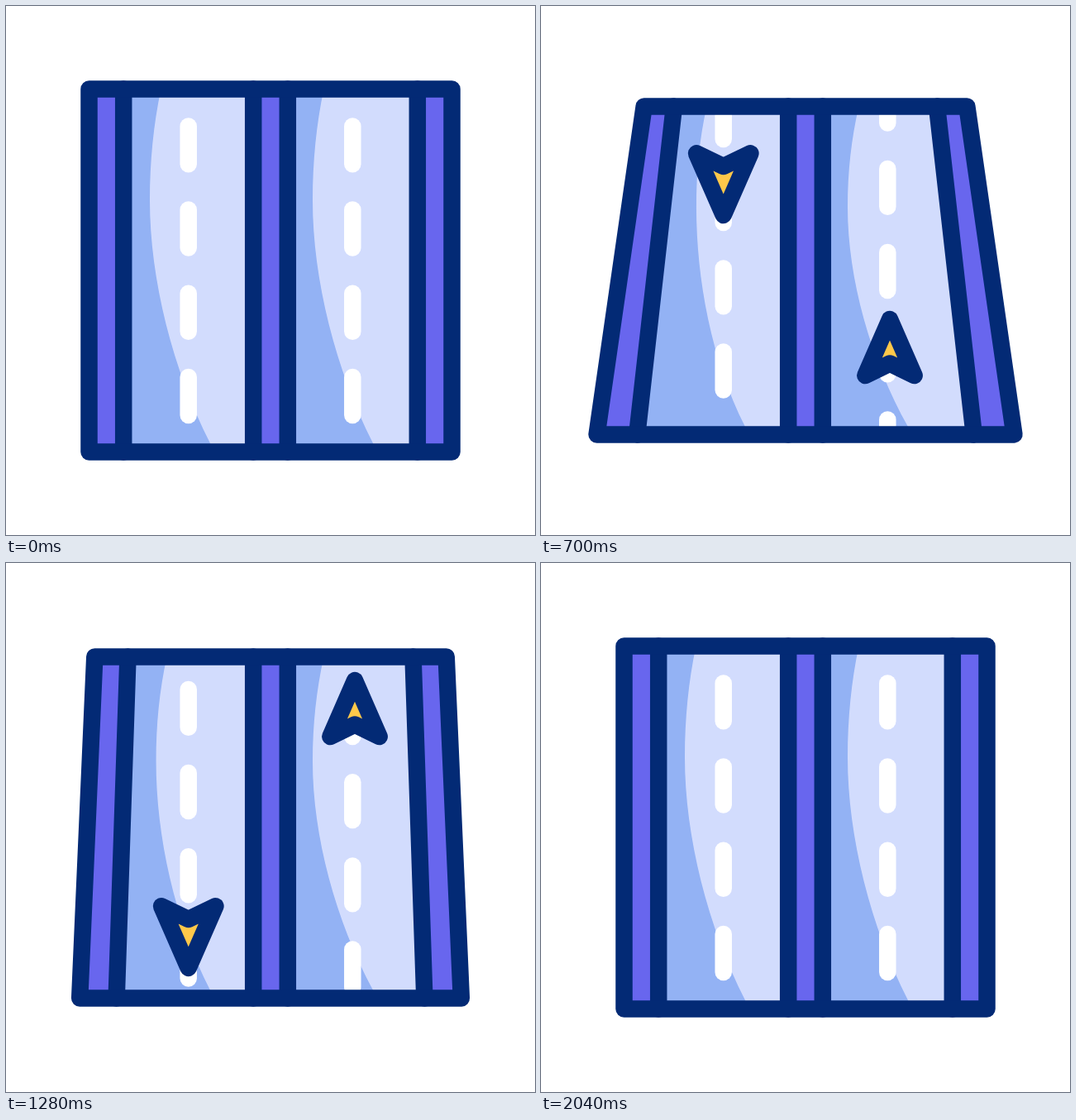
These frames come from a looping animation (640x640 px, 2.2 s). An HTML page with a canvas:

```html
<!DOCTYPE html>
<html lang="en">
<head>
<meta charset="utf-8">
<title>Two-way road</title>
<style>
  html, body { margin: 0; width: 100%; height: 100%; overflow: hidden; background: #fff; }
  canvas { display: block; width: 100vw; height: 100vh; }
</style>
</head>
<body>
<canvas id="stage" width="640" height="640"></canvas>
<script>
const ctx = document.getElementById('stage').getContext('2d');
const LOOP = 2200, STEP = 20;
const NAVY = '#032a75', PURPLE = '#6866ee', LANE = '#d2dcfd', SHADE = '#93b2f4', GOLD = '#ffc84a';
const LINE = 20.5, DASH = 45.9, PERIOD = 101.2, SPEED = 0.4085;

// Left half of the road; the right half mirrors it. bend = shift of the left shade.
const REST = { y: 100.5, top: 100.5, bottom: 100.5, inTop: 142.2, inBottom: 142.2, bend: 0 };
const NEAR = { y: 126.8, top: 130.6, bottom: 59.4, inTop: 165.6, inBottom: 109.8, bend: 17.4 };
const FAR = { y: 103.2, top: 89.3, bottom: 112.2, inTop: 133.5, inBottom: 152.1, bend: 0 };
const POSES = [[200, REST], [900, NEAR], [1600, FAR], [2000, REST]];

const mirror = x => 640 - x;

function ease(t, from, to) {
  const u = Math.min(1, Math.max(0, (t - from) / (to - from)));
  return u * u * (3 - 2 * u);
}

function poseAt(t) {
  const pose = { ...REST };
  for (let i = 1; i < POSES.length; i++) {
    const [t0, a] = POSES[i - 1], [t1, b] = POSES[i];
    if (t < t0) break;
    const k = ease(t, t0, t1);
    for (const key in pose) pose[key] = a[key] + (b[key] - a[key]) * k;
  }
  return pose;
}

function polygon(points) {
  const path = new Path2D();
  points.forEach(([x, y], i) => i ? path.lineTo(x, y) : path.moveTo(x, y));
  path.closePath();
  return path;
}

function fill(path, color) {
  ctx.fillStyle = color;
  ctx.fill(path);
}

function stroke(path, color) {
  ctx.strokeStyle = color;
  ctx.stroke(path);
}

function segment(x0, y0, x1, y1, color) {
  const path = new Path2D();
  path.moveTo(x0, y0);
  path.lineTo(x1, y1);
  stroke(path, color);
}

function shade(x, pose, bend, edge) {
  const scale = (320 - pose.y) / 219.5;
  const y = v => 320 + (v - 320) * scale;
  const b = bend * 0.94;
  const path = new Path2D();
  path.moveTo(edge, y(100.5));
  path.lineTo(x + 13.5 + b, y(100.5));
  path.bezierCurveTo(x + 4.5 + b, y(143), x + bend, y(188), x + bend, y(235));
  path.bezierCurveTo(x + bend, y(331), x + 28 + bend * 0.3, y(440), x + 73, y(529));
  path.lineTo(x + 78, y(539.5));
  path.lineTo(edge, y(539.5));
  fill(path, SHADE);
}

function lane(path, x, pose, bend, edge) {
  fill(path, LANE);
  ctx.save();
  ctx.clip(path);
  shade(x, pose, bend, edge);
  ctx.restore();
}

function dashes(x, shift) {
  const offset = ((shift % PERIOD) + PERIOD) % PERIOD;
  for (let i = -2; i < 5; i++) {
    const y = 145.4 + offset + i * PERIOD;
    segment(x, y, x, y + DASH, '#fff');
  }
}

// dir is 1 for pointing down, -1 for up
function arrow(x, tip, dir, half, length, notch) {
  const back = tip - dir * length;
  const path = polygon([[x, tip], [x - half, back], [x, back + dir * notch], [x + half, back]]);
  fill(path, GOLD);
  stroke(path, NAVY);
}

function draw(t) {
  const p = poseAt(t), y0 = p.y, y1 = mirror(p.y);
  const outline = polygon([[p.top, y0], [mirror(p.top), y0], [mirror(p.bottom), y1], [p.bottom, y1]]);
  const left = polygon([[p.inTop, y0], [299.2, y0], [299.2, y1], [p.inBottom, y1]]);
  const right = polygon([[340.8, y0], [mirror(p.inTop), y0], [mirror(p.inBottom), y1], [340.8, y1]]);

  ctx.fillStyle = '#fff';
  ctx.fillRect(0, 0, 640, 640);
  ctx.lineWidth = LINE;
  ctx.lineCap = ctx.lineJoin = 'round';

  fill(outline, PURPLE);
  lane(left, 174, p, p.bend, 90);
  lane(right, 371, p, 0, 330);

  ctx.save();
  ctx.clip(outline);
  dashes(220.7, -8 * PERIOD * ease(t, 240, 2040));
  dashes(419.3, 8 * PERIOD * ease(t, 200, 2000));
  const travel = SPEED * (t - 700);
  arrow(220.7, 253 + travel, 1, 32.7, 74.7, 15.7);
  arrow(422, 379 - travel, -1, 29.7, 68, 14.5);
  ctx.restore();

  segment(p.inTop, y0, p.inBottom, y1, NAVY);
  segment(mirror(p.inTop), y0, mirror(p.inBottom), y1, NAVY);
  segment(299.2, y0, 299.2, y1, NAVY);
  segment(340.8, y0, 340.8, y1, NAVY);
  stroke(outline, NAVY);
}

const start = performance.now();
function tick() {
  const t = (performance.now() - start) % LOOP;
  draw(Math.floor(t / STEP) * STEP);
  requestAnimationFrame(tick);
}
tick();
</script>
</body>
</html>
```
